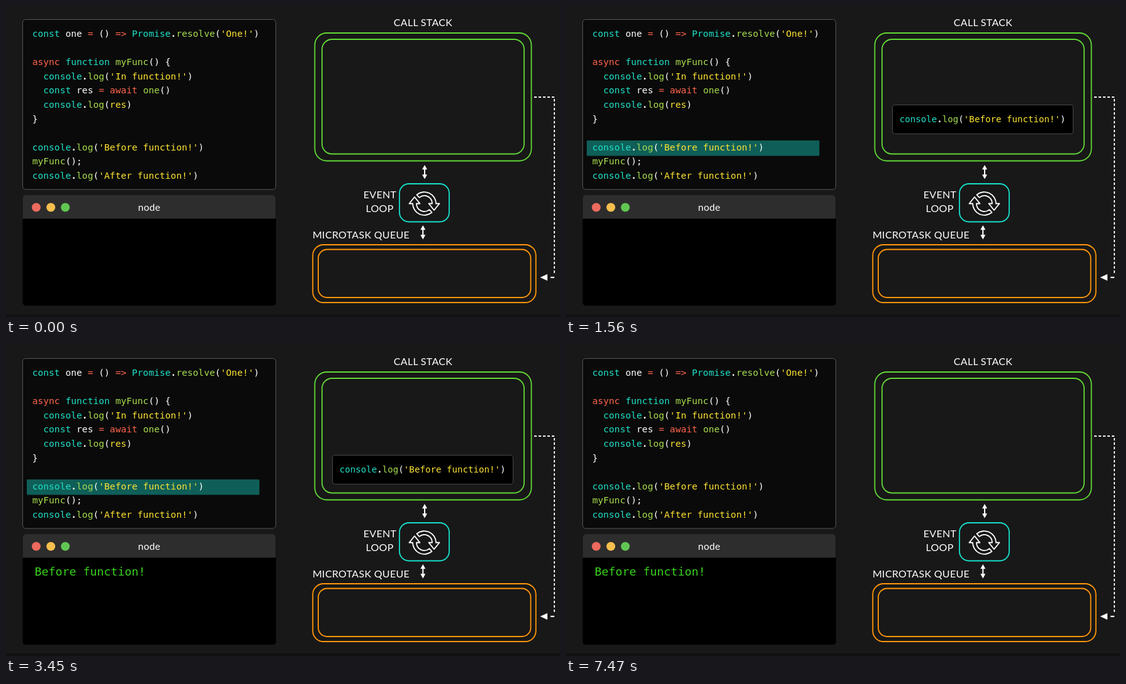
These frames come from a looping animation (880 px wide and 495 px high, 7500 ms). An HTML page:

```html
<!DOCTYPE html>
<html lang="en">
<head>
<meta charset="utf-8">
<title>Call stack and event loop</title>
<style>
  html, body { margin: 0; width: 100%; height: 100%; overflow: hidden; background: #181818; }
  svg { display: block; width: 880px; height: 495px; }
  text { fill: #fff; white-space: pre; }
  .mono { font-family: "DejaVu Sans Mono", monospace; }
  .label { font: 16px Lato, sans-serif; letter-spacing: .3px; text-anchor: middle; }
  .line { fill: none; stroke: #fff; stroke-width: 1.8; }
  .stack { stroke: #61d836; }
  .loop { stroke: #16e0cb; }
  .queue { stroke: #ff9609; }
  .builtin { fill: #1fe0c8; }
  .keyword { fill: #ff644e; }
  .call { fill: #a8dc4e; }
  .string { fill: #ffe432; }
  .dot { font-weight: bold; }
</style>
</head>
<body>
<svg viewBox="0 0 880 495">
  <defs>
    <path id="updown" d="M0-11.3 4-4H1V4H4L0 11.3-4 4H-1V-4H-4Z" fill="#fff"/>
    <path id="turn" class="line" stroke-linejoin="round"
      d="M-12-14A18.5 18.5 0 0 1 18.5 0H24L15.5 10.5 7 0H12.5A12.5 12.5 0 0 0-8-9.6Z"/>
  </defs>
  <rect width="880" height="495" fill="#181818"/>
  <rect y="491" width="880" height="4" fill="#121010"/>

  <rect x="26.5" y="21.5" width="402" height="270.5" rx="5" fill="#0a0a0a" stroke="#565656"/>
  <rect id="mark" x="33" y="214" width="369.5" height="24.5" rx="1" fill="#0f5f58"/>
  <g id="code" class="mono" font-size="14.62"></g>

  <rect x="26.5" y="301" width="402.5" height="176" rx="5"/>
  <path d="M26.5 338.5V306a5 5 0 0 1 5-5H423.5a5 5 0 0 1 5 5V338.5Z" fill="#2d2d2d"/>
  <circle cx="48" cy="320.5" r="7" fill="#ec6a5e"/>
  <circle cx="71.2" cy="320.5" r="7" fill="#f5bf4f"/>
  <circle cx="94.2" cy="320.5" r="7" fill="#61c554"/>
  <text class="label" x="227.5" y="326" style="font-size:15.5px">node</text>
  <text id="output" class="mono" x="45.5" y="367" font-size="18.3" style="fill:#38d01c"></text>

  <text class="label" x="662.5" y="32">CALL STACK</text>
  <rect class="line stack" x="490.5" y="43" width="344" height="203.5" rx="19"/>
  <rect class="line stack" x="502" y="53" width="321" height="182.5" rx="16"/>
  <use href="#updown" x="665" y="264.3"/>

  <text class="label" x="594" y="306">EVENT</text>
  <text class="label" x="593.5" y="328">LOOP</text>
  <rect class="line loop" x="625" y="283" width="79" height="60.5" rx="15"/>
  <g transform="translate(664.5 314.5)">
    <use href="#turn"/>
    <use href="#turn" transform="rotate(180)"/>
  </g>
  <use href="#updown" x="662.3" y="360.3"/>

  <text class="label" x="564" y="370">MICROTASK QUEUE</text>
  <rect class="line queue" x="487.3" y="380" width="354.4" height="92" rx="17"/>
  <rect class="line queue" x="496" y="387.5" width="337.5" height="76.5" rx="14"/>

  <path class="line" stroke-dasharray="4 3" d="M839 145H871V428"/>
  <path class="line" style="stroke-width:2.2" d="M871 432H865"/>
  <path d="M848.5 432 860 426.7V437.3Z" fill="#fff"/>

  <g id="card">
    <rect x="518.5" y="179" width="287" height="46" rx="4" stroke="#4a4a4a"/>
    <g id="call" class="mono" font-size="14.15"></g>
  </g>
</svg>
<script>
const LOOP = 7500, TRAVEL = 281, MOVE = 628;
const message = "Before function!";
const source = `const one = () => Promise.resolve('One!')

async function myFunc() {
  console.log('In function!')
  const res = await one()
  console.log(res)
}

console.log('Before function!')
myFunc();
console.log('After function!')`;

const $ = id => document.getElementById(id);
const clamp = v => Math.min(1, Math.max(0, v));
const progress = (t, start, length) => clamp((t - start) / length);

const tokens = /(?<string>'[^']*'|(?<=\()\w+)|(?<keyword>async|await|=>?)|(?<builtin>const|function|Promise|console)|(?<call>\w+(?=\())|(?<dot>\.)/g;

function paint(line) {
  return line.replace(tokens, (word, ...rest) => {
    const groups = rest.at(-1);
    const kind = Object.keys(groups).find(k => groups[k]);
    return `<tspan class="${kind}">${word}</tspan>`;
  });
}

const textLine = (line, x, y) => `<text x="${x}" y="${y}">${paint(line)}</text>`;

$("code").innerHTML = source.split("\n").map((line, i) => textLine(line, 41.7, 49 + i * 22.6)).join("");
$("call").innerHTML = textLine(`console.log('${message}')`, 529.7, 207);

function draw(now) {
  const t = now % LOOP;
  $("mark").setAttribute("opacity", progress(t, 220, 560) - progress(t, 3940, 440));

  // the card falls in from above, then leaves the same way
  const away = (1 - progress(t, 1200, MOVE)) ** 3 + progress(t, 3304, MOVE) ** 3;
  $("card").setAttribute("transform", `translate(0 ${-TRAVEL * away})`);

  const typed = Math.max(0, Math.floor((t - 2220) / 40) + 1);
  $("output").textContent = message.slice(0, typed);
}

function tick() {
  draw(performance.now());
  requestAnimationFrame(tick);
}
tick();
</script>
</body>
</html>
```
